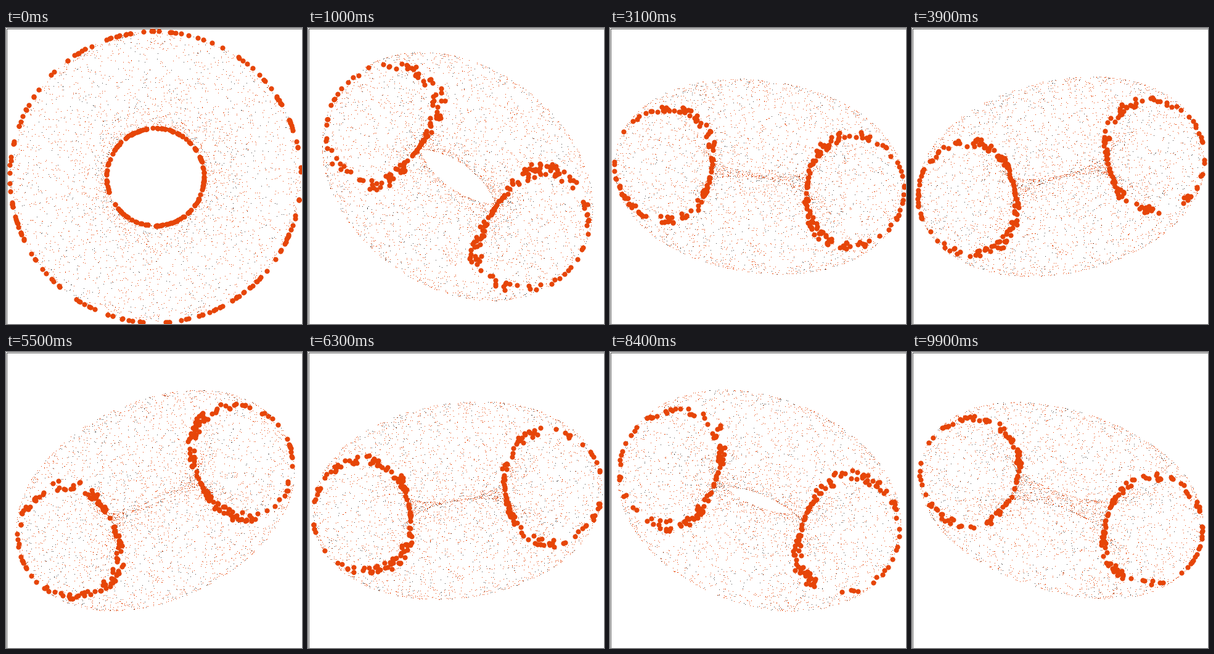
A matplotlib script that plays this animation: 480 px wide and 480 px high, repeating every 10 s.

```python
import numpy as np
import matplotlib.pyplot as plt
from matplotlib.animation import FuncAnimation
from matplotlib.patches import Rectangle

SIZE, DPI = 480, 100
FRAMES, INTERVAL = 100, 100
CENTER = np.array([242.0, 241.5])
UNIT = 78.8            # pixels per tube radius
SLICE = 0.14           # half thickness of the cutting slab
COUNT = 4000
ORANGE, DARK = "#e64508", "#454545"
PX = 72 / DPI

# Direction of the torus axis over time (seconds; x right, y down, z to viewer)
KEYS = np.array([
    (0.0, 0.000, 0.000, 1.000),
    (1.1, 0.470, -0.655, 0.590),
    (2.3, 0.572, -0.764, 0.298),
    (3.3, 0.020, -0.860, 0.510),
    (3.9, -0.197, -0.849, 0.490),
    (5.0, -0.360, -0.744, 0.563),
    (5.5, -0.365, -0.772, 0.520),
    (6.6, -0.030, -0.900, 0.430),
    (7.2, 0.146, -0.985, 0.090),
    (7.7, 0.220, -0.900, -0.370),
    (8.4, 0.297, -0.769, -0.566),
    (8.8, 0.280, -0.830, -0.480),
    (9.9, 0.279, -0.860, -0.427),
])
TIMES, AXES = KEYS[:, 0], KEYS[:, 1:]
SLOPES = np.gradient(AXES, TIMES, axis=0)


def axis_at(t):
    """Cubic Hermite path through the key directions."""
    i = int(np.clip(np.searchsorted(TIMES, t, side="right") - 1, 0, len(TIMES) - 2))
    h = TIMES[i + 1] - TIMES[i]
    s = (t - TIMES[i]) / h
    n = ((1 + 2 * s) * (1 - s) ** 2 * AXES[i] + s * (1 - s) ** 2 * h * SLOPES[i]
         + s * s * (3 - 2 * s) * AXES[i + 1] + s * s * (s - 1) * h * SLOPES[i + 1])
    return n / np.linalg.norm(n)


def tilt(n):
    """Shortest rotation taking the z axis onto n."""
    x, y, z = n
    k = 1 / (1 + z)
    return np.array([[1 - k * x * x, -k * x * y, x],
                     [-k * x * y, 1 - k * y * y, y],
                     [-x, -y, z]])


def torus(rng):
    u, v = rng.uniform(0, 2 * np.pi, (2, COUNT))
    ring = 2 + np.cos(v)
    return np.column_stack([ring * np.cos(u), ring * np.sin(u), np.sin(v)])


rng = np.random.default_rng(7)
points = torus(rng)
dark = rng.random(COUNT) < 0.22

fig = plt.figure(figsize=(SIZE / DPI, SIZE / DPI), dpi=DPI, facecolor="white")
ax = fig.add_axes([0, 0, 1, 1])
ax.set_xlim(0, SIZE)
ax.set_ylim(SIZE, 0)
ax.axis("off")
ax.add_patch(Rectangle((0.5, 0.5), SIZE - 1, SIZE - 1, fill=False, ec=DARK, lw=PX))

specks, = ax.plot([], [], ",", color=ORANGE)
shades, = ax.plot([], [], ",", color=DARK)
dots, = ax.plot([], [], "o", color=ORANGE, ms=8.2 * PX, mew=0)


def draw(frame):
    p = points @ tilt(axis_at(frame * INTERVAL / 1000)).T
    xy = CENTER + UNIT * p[:, :2]
    cut = np.abs(p[:, 2]) < SLICE
    for artist, mask in ((specks, ~cut & ~dark), (shades, ~cut & dark), (dots, cut)):
        artist.set_data(*xy[mask].T)
    return specks, shades, dots


anim = FuncAnimation(fig, draw, frames=FRAMES, interval=INTERVAL,
                     repeat=True, repeat_delay=0)
plt.show()
```
